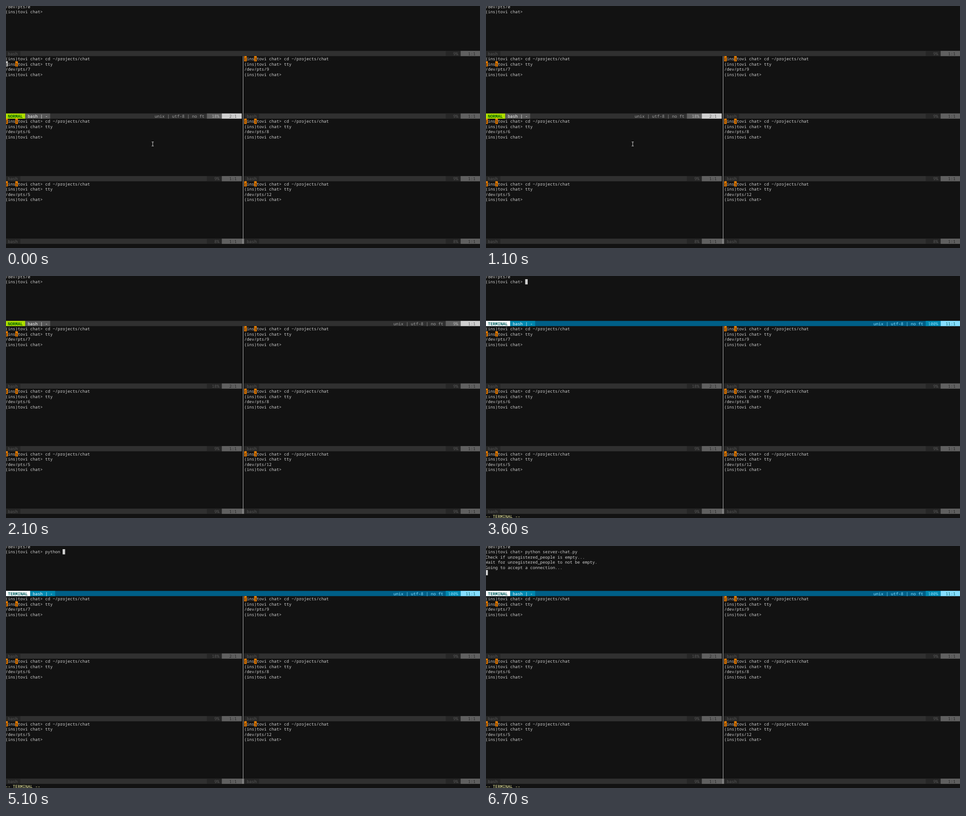
Write an HTML page with a canvas that moves like this. It is 1046 by 535 pixels and loops after 8000 ms.

```html
<!DOCTYPE html>
<html lang="en">
<head>
<meta charset="utf-8">
<style>
  html, body { margin: 0; width: 100%; height: 100%; overflow: hidden; background: #121212; }
  canvas { display: block; }
</style>
</head>
<body>
<canvas id="stage" width="1046" height="535"></canvas>
<script>
const ctx = document.getElementById('stage').getContext('2d');
const LOOP = 8000;
const BG = '#121212', FG = '#d0d0d0', ORANGE = '#ff8700', GRAY = '#808080';
const FONT = '9.15px "Noto Sans Mono", "DejaVu Sans Mono", monospace';
const PROMPT = '(ins)tovi chat> ';
const COMMAND = 'python server-chat.py ';

// [time, characters typed]
const TYPING = [[4400, 1], [4500, 2], [4800, 3], [4900, 4], [5000, 6],
                [5100, 7], [5300, 8], [5400, 9], [5500, 22]];

// Status bar colours: [text, background] per section
const THEMES = {
  inactive: { name: ['#585858', '#262626'], bar: ['#585858', '#303030'],
              percent: ['#585858', '#262626'], place: ['#262626', '#606060'] },
  NORMAL: { mode: ['#005f00', '#afdf00'], name: ['#ffffff', '#585858'],
            bar: ['#9e9e9e', '#303030'], percent: ['#bcbcbc', '#606060'],
            place: ['#606060', '#d0d0d0'] },
  TERMINAL: { mode: ['#005f5f', '#ffffff'], name: ['#ffffff', '#0087af'],
              bar: ['#87dfff', '#005f87'], percent: ['#87dfff', '#0087af'],
              place: ['#005f5f', '#87dfff'] }
};

// Terminal grid to pixels
const CELL_W = 5.49, CELL_H = 11.53;
const colX = col => -1.35 + col * CELL_W;
const rowY = row => 7 + row * CELL_H;

function fillCells(col, row, cols, color, rows = 1) {
  ctx.fillStyle = color;
  ctx.fillRect(colX(col), rowY(row), cols * CELL_W, rows * CELL_H);
}

function write(col, row, text, color = FG, weight = '') {
  ctx.font = `${weight} ${FONT}`;
  ctx.fillStyle = color;
  [...text].forEach((ch, i) => {
    if (ch !== ' ') ctx.fillText(ch, colX(col + i), rowY(row) + 9.3);
  });
}

function section(col, row, text, [color, background], weight) {
  fillCells(col, row, text.length, background);
  write(col, row, text, color, weight);
}

function statusBar(left, right, row, mode, percent, place) {
  const theme = THEMES[mode];
  const active = mode !== 'inactive';
  let col = left;
  fillCells(left, row, right - left, theme.bar[1]);
  if (active) {
    section(col, row, ` ${mode} `, theme.mode, 'bold');
    col += mode.length + 2;
    write(right - 35, row, 'unix | utf-8 | no ft', theme.bar[0]);
  }
  section(col, row, active ? ' bash | - ' : ' bash ', theme.name);
  section(right - 14, row, percent.padStart(5) + ' ', theme.percent);
  section(right - 8, row, place.padStart(6) + '  ', theme.place);
}

function pane(col, row, tty, parenRow, cursorOn) {
  [PROMPT + 'cd ~/projects/chat', PROMPT + 'tty', '/dev/pts/' + tty, PROMPT]
    .forEach((line, i) => write(col, row + i, line));
  section(col, row + parenRow, '(', [BG, cursorOn ? FG : ORANGE], 'bold');
  section(col + 4, row + parenRow, ')', [BG, ORANGE], 'bold');
}

function drawDivider() {
  fillCells(95, 9, 1, '#080808', 35);
  ctx.fillStyle = GRAY;
  ctx.fillRect(522.4, rowY(9), 1.8, 35 * CELL_H);
  fillCells(95, 44, 1, GRAY);
}

function drawPointer() {
  ctx.fillStyle = FG;
  ctx.fillRect(321.5, 300, 4.5, 1);
  ctx.fillRect(323.3, 300, 1, 10);
  ctx.fillRect(321.5, 309, 4.5, 1);
}

function drawServer(t) {
  const typed = TYPING.reduce((n, [time, count]) => t >= time ? count : n, 0);
  const running = t >= 6700;
  write(0, -1, '/dev/pts/0');
  write(0, 0, PROMPT + COMMAND.slice(0, typed));
  if (running) {
    ['Check if unregistered_people is empty...',
     'Wait for unregistered_people to not be empty.',
     'Going to accept a connection...'].forEach((line, i) => write(0, i + 1, line));
  }
  if (t >= 3600) fillCells(running ? 0 : PROMPT.length + typed, running ? 4 : 0, 1, FG);
}

function draw(t) {
  const movedUp = t >= 2000, terminal = t >= 3600;
  const cursorOn = !movedUp && (t + 400) % 1000 < 500;
  const bottomPercent = t >= 2100 ? '9%' : '8%';

  ctx.fillStyle = BG;
  ctx.fillRect(0, 0, 1046, 535);

  drawServer(t);
  statusBar(0, 191, 8, terminal ? 'TERMINAL' : movedUp ? 'NORMAL' : 'inactive',
            terminal ? '100%' : '9%', terminal ? '11:1' : '1:1');
  drawDivider();

  [[7, 9], [6, 8], [5, 12]].forEach(([leftTty, rightTty], i) => {
    const row = 9 + i * 12, top = i === 0;
    const percent = i === 2 ? bottomPercent : '9%';
    pane(0, row, leftTty, top ? 1 : 0, top && cursorOn);
    pane(96, row, rightTty, 0, false);
    statusBar(0, 95, row + 11, top && !movedUp ? 'NORMAL' : 'inactive',
              top ? '18%' : percent, top ? '2:1' : '1:1');
    statusBar(96, 191, row + 11, 'inactive', percent, '1:1');
  });

  if (t < 1600) drawPointer();
  if (terminal) write(0, 45, '-- TERMINAL --', '#ffffaf');
}

ctx.textRendering = 'geometricPrecision';
const start = performance.now();
function tick() {
  draw((performance.now() - start) % LOOP);
  requestAnimationFrame(tick);
}
tick();
</script>
</body>
</html>
```
